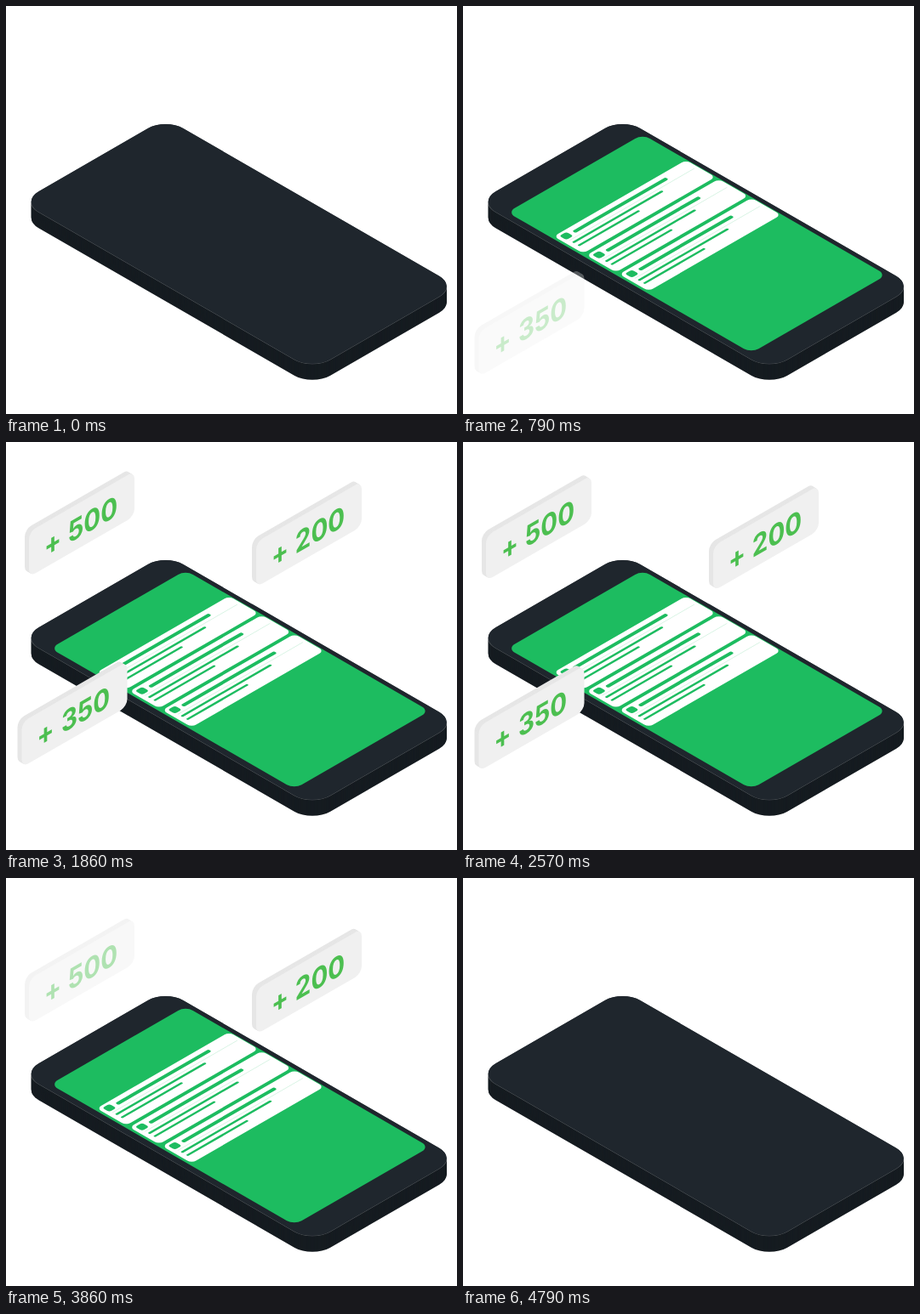
Animation, 530 px wide and 480 px high, one loop 5000 ms. Source, as an HTML page:

```html
<!DOCTYPE html>
<html lang="en">
<head>
<meta charset="utf-8">
<title>Phone with rising amounts</title>
<style>
  html, body { margin: 0; width: 100%; height: 100%; overflow: hidden; background: #fff; }
  svg { display: block; width: 530px; height: 480px; }
  text { font: 700 34px Inter, "Open Sans", sans-serif; fill: #4cbf50; text-anchor: middle; }
</style>
</head>
<body>
<svg id="stage" viewBox="0 0 530 480"></svg>
<script>
const LOOP = 5000, FPS = 14, FADE = 333;
const GREEN = '#1dbc60';
const stage = document.getElementById('stage');

const rect = (x, y, w, h, r, fill, extra = '') =>
  `<rect x="${x}" y="${y}" width="${w}" height="${h}" rx="${r}" fill="${fill}" ${extra}/>`;
const place = (matrix, x, y, body) =>
  `<g transform="matrix(${matrix},${x},${y})">${body}</g>`;
const floor = (x, y, body) => place('.866,.5,-.866,.5', x, y, body);
const reading = (x, y, body) => place('.866,-.5,.866,.5', x, y, body);
const wall = (x, y, body) => place('.866,-.5,0,1', x, y, body);
const repeat = (count, make) => Array.from({ length: count }, (_, i) => make(i)).join('');
const line = (x1, x2, y, width, extra = '') =>
  `<path d="M${x1} ${y}H${x2}" stroke="${GREEN}" stroke-width="${width}" stroke-linecap="round" ${extra}/>`;

function phone() {
  const face = (fill, extra) => rect(0, 0, 395.5, 196.3, 24, fill, extra);
  return repeat(20, i => floor(187.5, 151 - i, face('#151b20'))) +
    floor(187.5, 132, face('none', 'stroke="#fff" stroke-opacity=".3"') + face('#1f262d'));
}

function listItem(i) {
  return reading(106.6 + 38.5 * i, 271 + 22.25 * i,
    rect(0, 0, 179.5, 40, 6, '#fff') +
    rect(4.3, 3.3, 9.5, 9.5, 3, GREEN) +
    line(6, 175, 15.5, 0.5, 'opacity=".3"') +
    line(21, 143, 8.5, 4.5) +
    line(7, 126, 20.5, 2.8) +
    line(7, 87, 27.8, 2.8));
}

const badges = [
  { amount: 500, x: 27, y: 110.5, enter: 1036, leave: 3671 },
  { amount: 350, x: 18.5, y: 334.5, enter: 736, leave: 3371 },
  { amount: 200, x: 294, y: 122.5, enter: 1336, leave: 3971 }
];

function badge({ amount, x, y }) {
  const plate = fill => rect(0, 0, 143.2, 53, 9, fill);
  return '<g class="badge">' +
    repeat(5, i => wall(x - 5 + i, y - 3 + i * 0.6, plate('#e6e6e6'))) +
    wall(x, y, plate('#f0f0f0') +
      '<text x="32.3" y="40.6">+</text>' +
      `<text x="86.6" y="40.6">${amount}</text>`) +
    '</g>';
}

stage.innerHTML = phone() +
  `<g id="screen">${floor(211, 150.9, rect(0, 0, 331, 183.5, 10, GREEN))}${repeat(3, listItem)}</g>` +
  badges.map(badge).join('');

const screenGroup = document.getElementById('screen');
const badgeGroups = document.querySelectorAll('.badge');
const clamp = v => Math.max(0, Math.min(1, v));
const visibility = (t, enter, rise, leave) =>
  Math.min(clamp((t - enter) / rise), clamp(1 - (t - leave) / FADE));

function draw(now) {
  const t = Math.floor((now % LOOP + 5) * FPS / 1000) * 1000 / FPS;
  screenGroup.setAttribute('opacity', visibility(t, 238, FADE, 4450));
  badges.forEach(({ enter, leave }, i) => {
    // Ease up into place, then sink slowly
    const rise = 32 * (1 + Math.cos(Math.PI * clamp((t - enter) / FADE)));
    const drift = (t - 2571) * 0.0066;
    badgeGroups[i].setAttribute('opacity', visibility(t, enter, FADE / 2, leave));
    badgeGroups[i].setAttribute('transform', `translate(0 ${rise + drift})`);
  });
}

const start = performance.now();
function tick() {
  draw(performance.now() - start);
  requestAnimationFrame(tick);
}
tick();
</script>
</body>
</html>
```
